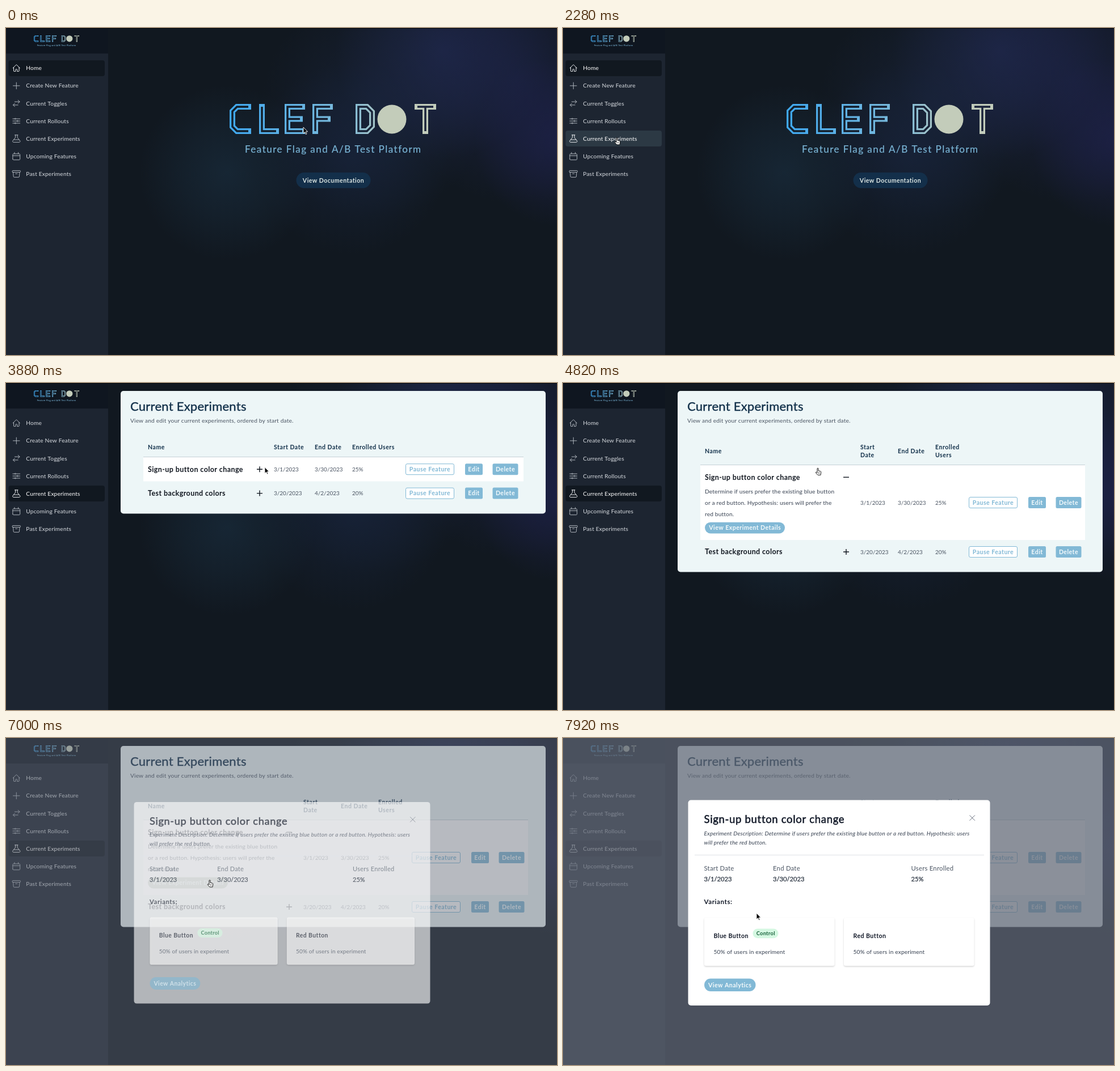
Animation of 971 by 577 pixels, one loop 8000 ms. Source, as an HTML page with a canvas:

```html
<!DOCTYPE html>
<html lang="en">
<head>
<meta charset="utf-8">
<title>Feature flag dashboard</title>
<style>
html, body { margin: 0; width: 100%; height: 100%; overflow: hidden; background: #111820; }
canvas { display: block; }
</style>
</head>
<body>
<canvas id="stage" width="971" height="577"></canvas>
<script>
const W = 971, H = 577, LOOP = 8000;
const ctx = document.getElementById('stage').getContext('2d');
const BLUE = '#82b9d6', NAVY = '#12304a', INK = '#10161f', GREY = '#4b5563', SAND = '#bcc9bd';

// font, letter spacing, extra stroke weight
const TYPE = {
  body: ['10.2px', 0.15, 0],
  date: ['10px', 0, 0],
  head: ['700 10.5px', 0.55, 0],
  row: ['700 12.5px', 0.41, 0],
  button: ['700 10.6px', 0.45, 0],
  title: ['22px', 0.26, 0.4],
  tagline: ['17px', 1.48, 0.2],
  modalTitle: ['18.5px', 0.68, 0.5],
  note: ['italic 10px', 0.2, 0],
  label: ['11.3px', 0.25, 0],
  value: ['11.2px', 0, 0.2],
  section: ['700 11.5px', 0.6, 0],
  badge: ['700 9.3px', 0.3, 0]
};

function text(c, str, x, y, type, color, align = 'left') {
  const [font, gap, heft] = TYPE[type];
  c.font = font + ' Lato, "Open Sans", sans-serif';
  c.letterSpacing = gap + 'px';
  c.textAlign = align;
  c.fillStyle = color;
  c.fillText(str, x, y);
  if (heft) {
    c.strokeStyle = color;
    c.lineWidth = heft;
    c.strokeText(str, x, y);
  }
}

function box(x, y, w, h, r, fill, stroke) {
  ctx.beginPath();
  ctx.roundRect(x, y, w, h, r);
  if (fill) { ctx.fillStyle = fill; ctx.fill(); }
  if (stroke) { ctx.strokeStyle = stroke; ctx.lineWidth = 1; ctx.stroke(); }
}

function lines(d, color, width) {
  ctx.strokeStyle = color;
  ctx.lineWidth = width;
  ctx.stroke(new Path2D(d));
}

function layer(w, h, paint) {
  const c = document.createElement('canvas');
  c.width = w;
  c.height = h;
  paint(c.getContext('2d'));
  return c;
}

// Wordmark: inline capitals, one plain disc
const GLYPHS = [
  [394, 'M33 5H13L5 13V40L13 48H33'],
  [446, 'M5 5V48H30'],
  [491, 'M31 5H5V48H31M5 26.5H27'],
  [540, 'M31 5H5V48M5 26.5H27'],
  [616, 'M5 5H20L29 14V39L20 48H5Z'],
  [720, 'M5 5H33M19 5V48']
];

function logo(scale) {
  return layer(Math.ceil(380 * scale), Math.ceil(100 * scale), c => {
    c.scale(scale, scale);
    c.translate(-390, -130);
    const ramp = c.createLinearGradient(394, 0, 758, 0);
    ramp.addColorStop(0, '#3fa8f0');
    ramp.addColorStop(0.58, '#80bbd8');
    ramp.addColorStop(0.8, '#bfcabb');
    ramp.addColorStop(1, '#c3cdbb');

    const word = new Path2D();
    for (const [x, d] of GLYPHS) word.addPath(new Path2D(d), new DOMMatrix([1, 0, 0, 1, x, 134]));
    c.lineCap = 'square';
    c.lineWidth = 10;
    c.strokeStyle = ramp;
    c.stroke(word);
    c.globalCompositeOperation = 'destination-out';
    c.lineCap = 'butt';
    c.lineWidth = 3.4;
    c.stroke(word);
    c.globalCompositeOperation = 'source-over';

    c.fillStyle = '#c3ccba';
    c.beginPath();
    c.arc(680, 161, 25.5, 0, 7);
    c.fill();
    text(c, 'Feature Flag and A/B Test Platform', 421, 220, 'tagline', '#7ab5d6');
  });
}

const bigLogo = logo(1), smallLogo = logo(0.22);

const backdrop = layer(W, H, c => {
  c.fillStyle = '#111820';
  c.fillRect(0, 0, W, H);
  const glow = (x, y, r, rgb, a) => {
    const g = c.createRadialGradient(x, y, 0, x, y, r);
    g.addColorStop(0, `rgba(${rgb},${a})`);
    g.addColorStop(0.5, `rgba(${rgb},${a * 0.55})`);
    g.addColorStop(1, `rgba(${rgb},0)`);
    c.fillStyle = g;
    c.fillRect(0, 0, W, H);
  };
  glow(770, 40, 190, '34,43,84', 0.65);
  glow(900, 90, 220, '32,38,82', 0.5);
  glow(975, 200, 150, '34,36,86', 0.55);
  glow(390, 255, 155, '28,52,72', 0.5);
  glow(610, 230, 170, '26,42,74', 0.4);
  glow(650, 135, 200, '30,42,74', 0.4);
  c.fillStyle = '#0f1620';
  c.fillRect(0, 0, 180, 45);
  c.fillStyle = '#1d2531';
  c.fillRect(0, 45, 180, H - 45);
  c.fillStyle = '#05070a';
  c.fillRect(0, 0, W, 1);
});

const MENU = [
  ['Home', 'M2.25 12L11.2 3.05a1.1 1.1 0 011.6 0L21.75 12M4.5 9.75v10.1c0 .6.5 1.1 1.1 1.1H9.75V16.1c0-.6.5-1.1 1.1-1.1h2.25c.6 0 1.1.5 1.1 1.1V21h4.1c.6 0 1.1-.5 1.1-1.1V9.75'],
  ['Create New Feature', 'M12 3v18M3 12h18'],
  ['Current Toggles', 'M7.5 21L3 16.5L7.5 12M3 16.5h13.5M16.5 3L21 7.5L16.5 12M21 7.5H7.5'],
  ['Current Rollouts', 'M2 6H7.5M10.5 6H22M7.5 6a1.5 1.5 0 103 0a1.5 1.5 0 10-3 0M2 12h11.5M16.5 12H22M13.5 12a1.5 1.5 0 103 0a1.5 1.5 0 10-3 0M2 18H7.5M10.5 18H22M7.5 18a1.5 1.5 0 103 0a1.5 1.5 0 10-3 0'],
  ['Current Experiments', 'M9.25 2v7L2 18c-1 1.6 0 4 2 4h16c2 0 3-2.4 2-4L14.75 9V2M7.75 2h8.5M5 15h14'],
  ['Upcoming Features', 'M6.75 1.5v3.75M17.25 1.5v3.75M2 19.75V7.5c0-1.2 1-2.25 2.25-2.25h15.5C21 5.25 22 6.3 22 7.5v12.25c0 1.25-1 2.25-2.25 2.25H4.25C3 22 2 21 2 19.75zM2 10.5h20'],
  ['Past Experiments', 'M20.75 7.5l-.6 11.6c-.1 1.2-1 2.1-2.2 2.1H6.1c-1.2 0-2.2-.9-2.2-2.1L3.25 7.5M9.5 11.5h5M2 7.5h20c.6 0 1.1-.5 1.1-1.1V4c0-.6-.5-1.1-1.1-1.1H2c-.6 0-1.1.5-1.1 1.1v2.4c0 .6.5 1.1 1.1 1.1z']
].map(([name, d]) => [name, new Path2D(d)]);

const itemY = i => 70.8 + 31.1 * i;

function itemAt([x, y]) {
  if (x < 5 || x > 174) return -1;
  return MENU.findIndex((m, i) => Math.abs(y - itemY(i)) <= 14);
}

function sidebar(active, hover) {
  ctx.drawImage(smallLogo, 48, 12);
  MENU.forEach(([name, icon], i) => {
    const y = itemY(i), lit = i === active || i === hover;
    if (lit) box(4.5, Math.round(y - 14), 169.5, 28, 4, i === active ? '#111820' : '#2c3944');
    ctx.save();
    ctx.translate(18.3 - 12 * 0.64, y - 12 * 0.64);
    ctx.scale(0.64, 0.64);
    ctx.lineWidth = 1.5;
    ctx.lineCap = ctx.lineJoin = 'round';
    ctx.strokeStyle = lit ? '#f4f6f8' : '#b4bac2';
    ctx.stroke(icon);
    ctx.restore();
    text(ctx, name, 35.3, y + 3.5, 'body', lit ? '#ffffff' : '#d7dbe0');
  });
}

function home() {
  ctx.drawImage(bigLogo, 390, 130);
  box(511.5, 255, 131, 27.5, 13.7, '#132f4a');
  text(ctx, 'View Documentation', 577, 272.5, 'button', '#dde7e4', 'center');
}

function tableRow(y, at, dates, share) {
  dates.forEach((d, i) => text(ctx, d, at.cols[i], y + 3.7, 'date', GREY));
  text(ctx, share, at.cols[2], y + 3.7, 'date', GREY);
  const b = at.buttons;
  box(b + 0.5, y - 9.5, 85, 19, 2.5, '#ffffff', BLUE);
  text(ctx, 'Pause Feature', b + 43, y + 3.8, 'button', BLUE, 'center');
  box(b + 105, y - 10, 31, 20, 2.5, BLUE);
  text(ctx, 'Edit', b + 120.5, y + 3.8, 'button', '#f3fafc', 'center');
  box(b + 153.5, y - 10, 45, 20, 2.5, BLUE);
  text(ctx, 'Delete', b + 176, y + 3.8, 'button', '#f3fafc', 'center');
}

function experiments(open, hover) {
  const at = open
    ? { head: 124, top: 145, right: 920, rowH: 132, name: 166.3, mid: 211, next: 298, sign: 499, cols: [524, 590, 656], buttons: 715 }
    : { head: 117, top: 131, right: 912, rowH: 42.5, name: 152.2, mid: 152.2, next: 194.6, sign: 447, cols: [472, 544, 610], buttons: 704 };
  box(202, 14, 749, open ? 319.5 : 216.5, 5, '#edf6f7');
  text(ctx, 'Current Experiments', 219, 48.8, 'title', NAVY);
  text(ctx, 'View and edit your current experiments, ordered by start date.', 219, 70.2, 'body', GREY);

  text(ctx, 'Name', 250, at.head, 'head', NAVY);
  ['Start Date', 'End Date', 'Enrolled Users'].forEach((label, i) => {
    if (open && i !== 1) {
      label.split(' ').forEach((word, j) => text(ctx, word, at.cols[i], 117 + 14 * j, 'head', NAVY));
    } else text(ctx, label, at.cols[i], at.head, 'head', NAVY);
  });

  box(242, at.top, at.right - 242, at.rowH, 0, '#ffffff');
  box(242, at.top - 1, at.right - 242, 1, 0, '#c5d0d6');
  text(ctx, 'Sign-up button color change', 250, at.name + 4.3, 'row', INK);
  text(ctx, 'Test background colors', 250, at.next + 4.3, 'row', INK);
  const s = at.sign;
  lines(`M${s - 5} ${at.name}h10` + (open ? '' : `M${s} ${at.name - 5}v10`), INK, 1.4);
  lines(`M${s - 5} ${at.next}h10M${s} ${at.next - 5}v10`, INK, 1.4);
  tableRow(at.mid, at, ['3/1/2023', '3/30/2023'], '25%');
  tableRow(at.next, at, ['3/20/2023', '4/2/2023'], '20%');

  if (open) {
    ['Determine if users prefer the existing blue button',
      'or a red button. Hypothesis: users will prefer the',
      'red button.'].forEach((l, i) => text(ctx, l, 250, 195.3 + 19.8 * i, 'body', '#374151'));
    box(250, 245.7, 141, 19.8, 9.9, hover ? SAND : BLUE);
    text(ctx, 'View Experiment Details', 320.7, 259.3, 'button', '#f5fafb', 'center');
  }
}

function variant(x, name) {
  ctx.save();
  ctx.shadowColor = 'rgba(0,0,0,.17)';
  ctx.shadowBlur = 3;
  ctx.shadowOffsetY = 1.5;
  box(x, 317, 229.5, 85, 3, '#ffffff');
  ctx.restore();
  text(ctx, name, x + 16.5, 353, 'button', '#111827');
  text(ctx, '50% of users in experiment', x + 16.5, 381.4, 'body', '#374151');
}

function dialog() {
  box(220.5, 109.5, 532, 362.5, 5, '#ffffff');
  text(ctx, 'Sign-up button color change', 248.5, 150, 'modalTitle', '#111827');
  lines('M716.5 136.3l9.4 9.4M725.9 136.3l-9.4 9.4', '#6b7280', 1);
  text(ctx, 'Experiment Description: Determine if users prefer the existing blue button or a red button. Hypothesis: users', 248.5, 172, 'note', '#374151');
  text(ctx, 'will prefer the red button.', 248.5, 187.6, 'note', '#374151');
  box(232, 206, 510, 1, 0, '#dfe2e7');
  [['Start Date', '3/1/2023', 248.5], ['End Date', '3/30/2023', 370], ['Users Enrolled', '25%', 613.5]].forEach(([k, v, x]) => {
    text(ctx, k, x, 233.5, 'label', GREY);
    text(ctx, v, x, 253.2, 'value', '#1f2937');
  });
  text(ctx, 'Variants:', 248.5, 293, 'section', '#111827');
  variant(249, 'Blue Button');
  variant(495, 'Red Button');
  box(334.5, 336.5, 45, 16.7, 8.3, '#d5f8e2');
  text(ctx, 'Control', 357.2, 348.3, 'badge', '#17603a', 'center');
  box(249, 424.5, 90.5, 22.5, 11.2, BLUE);
  text(ctx, 'View Analytics', 294.2, 439.5, 'button', '#f5fafb', 'center');
}

function modal(p) {
  ctx.fillStyle = `rgba(97,104,117,${0.73 * p})`;
  ctx.fillRect(0, 0, W, H);
  const k = 0.95 + 0.05 * p;
  ctx.save();
  ctx.globalAlpha = p;
  ctx.translate(486.5, 290.8);
  ctx.scale(k, k);
  ctx.translate(-486.5, -290.8);
  dialog();
  ctx.restore();
}

// Pointer moves: first step, last step, step count, end point, optional bend
const START = [524, 175];
const MOVES = [
  [90, 340, 4, [303, 173]],
  [840, 1640, 11, [105, 158], [130, 118]],
  [1720, 2280, 8, [95, 193.5]],
  [3480, 3880, 6, [456, 148.5]],
  [4310, 4560, 4, [449, 150]],
  [5670, 6410, 10, [357.5, 249.5]],
  [6490, 6490, 1, [359, 250.5]],
  [7680, 7920, 4, [341, 309]]
];

function stepped(t, from, to, n) {
  if (t < from) return 0;
  if (t >= to) return 1;
  return (Math.floor((t - from) / ((to - from) / (n - 1))) + 1) / n;
}

function pointer(t) {
  let pos = START;
  for (const [from, to, n, end, bend] of MOVES) {
    const u = stepped(t, from, to, n);
    if (!u) break;
    const s = (u + u * u * (3 - 2 * u)) / 2, a = pos;
    const mid = bend || [(a[0] + end[0]) / 2, (a[1] + end[1]) / 2];
    pos = a.map((v, i) => (1 - s) ** 2 * v + 2 * s * (1 - s) * mid[i] + s * s * end[i]);
  }
  return pos;
}

const ARROW = new Path2D('M0 0V11L2.6 8.6 4.3 12.6 6 11.9 4.3 8H7.6Z');
const HAND = new Path2D('M3.2 1.2a1 1 0 0 1 2 0V4.8l3.6.9c.8.2 1.2.8 1.1 1.6L9.2 12.4H4.2L.6 8.4c-.6-.9.6-1.7 1.4-1l1.2 1z');
const KNUCKLES = new Path2D('M5.4 7.4v2.6M7 7.4v2.6');

function cursor([x, y], hand) {
  ctx.save();
  ctx.translate(hand ? x - 4.2 : x, y);
  ctx.lineJoin = 'round';
  ctx.lineWidth = 0.9;
  ctx.fillStyle = hand ? '#fff' : '#000';
  ctx.strokeStyle = hand ? '#000' : '#fff';
  const shape = hand ? HAND : ARROW;
  ctx.fill(shape);
  ctx.stroke(shape);
  if (hand) {
    ctx.lineWidth = 0.6;
    ctx.stroke(KNUCKLES);
  }
  ctx.restore();
}

function draw(t) {
  const pos = pointer(t), [x, y] = pos;
  const item = itemAt(pos);
  const open = t >= 4820;
  const onPlus = t >= 4310 && t < 5670 && Math.abs(x - 447) < 6;
  const onDetails = open && t < 7680 && x > 250 && x < 391 && y > 246 && y < 266;

  ctx.drawImage(backdrop, 0, 0);
  if (t < 2880) {
    sidebar(0, item);
    home();
  } else {
    sidebar(4, item);
    experiments(open, onDetails);
  }
  const u = stepped(t, 6920, 7160, 4);
  if (u) modal(1 - (1 - u) ** 1.4);
  cursor(pos, item >= 0 || onPlus || onDetails);
}

const begin = performance.now();
function tick() {
  draw((performance.now() - begin) % LOOP);
  requestAnimationFrame(tick);
}
tick();
</script>
</body>
</html>
```
